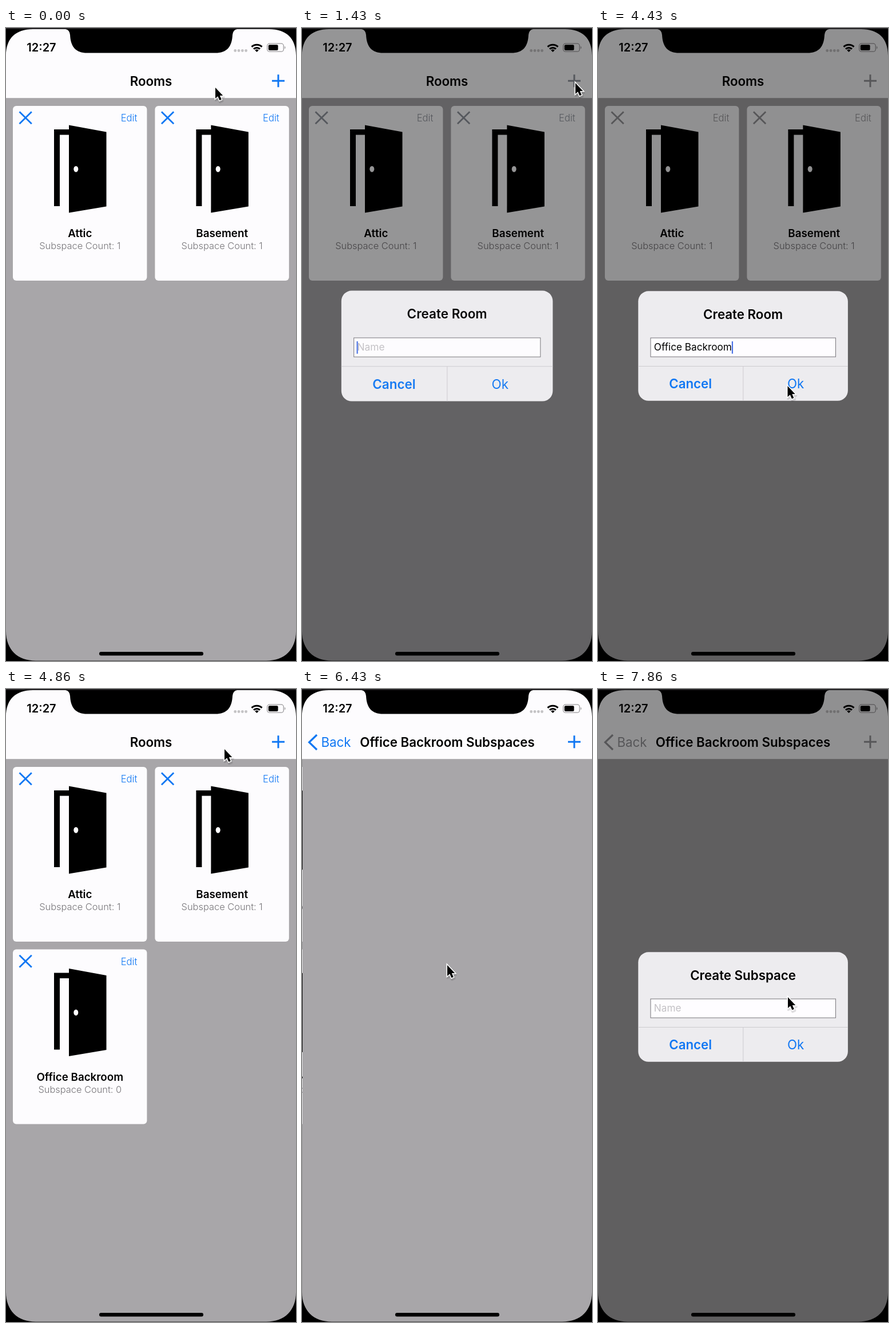
Animation of 507 by 1105 pixels, one loop 8000 ms. Source, as an HTML page:

```html
<!DOCTYPE html>
<html lang="en">
<head>
<meta charset="utf-8">
<title>Rooms</title>
<style>
html, body { margin: 0; width: 100%; height: 100%; overflow: hidden; background: #000; }
svg { display: block; width: 507px; height: 1105px; font-family: Inter, "Open Sans", sans-serif; }
.mid { text-anchor: middle; }
.bold { font-weight: 600; }
.thin { font-weight: 300; }
.nav { font-size: 22.3px; }
.line { fill: none; stroke: var(--tint); }
.tint { fill: var(--tint); }
</style>
</head>
<body>
<svg id="stage" viewBox="0 0 507 1105">
  <defs>
    <clipPath id="body"><rect y="123" width="507" height="982"/></clipPath>
    <g id="door">
      <path d="M84 177H111V186.5H94V311H84Z"/>
      <path d="M110 169.5L175.5 181.5V311.5L110 322.5Z"/>
      <ellipse cx="122.3" cy="246.2" rx="4" ry="5.3" fill="#fdfcfe"/>
    </g>
  </defs>

  <rect width="507" height="1105" fill="#a8a6a9"/>
  <g clip-path="url(#body)">
    <g id="rooms"></g>
    <rect id="veil" y="123" width="507" height="982"/>
    <rect id="page" y="123" width="507" height="982" fill="#a8a6a9"/>
  </g>

  <rect width="507" height="122.5" fill="#fdfcfe"/>
  <rect y="122" width="507" height="1" fill="#b9b7ba"/>
  <text id="title" class="mid bold nav" y="100.5">Rooms</text>
  <text id="subtitle" class="mid bold nav" y="100.5">Office Backroom Subspaces</text>
  <g id="back">
    <path class="line" d="M26 80L12.5 93L26 106" stroke-width="3.2"/>
    <text class="tint nav" x="33.5" y="100.5">Back</text>
  </g>
  <path class="line" d="M465 92.3H487M476 81.3V103.3" stroke-width="3"/>

  <text class="mid bold" x="62" y="41.3" font-size="20">12:27</text>
  <g fill="#c4c3c5">
    <circle cx="400.7" cy="39.5" r="2.4"/><circle cx="407" cy="39.5" r="2.4"/>
    <circle cx="413.3" cy="39.5" r="2.4"/><circle cx="419.6" cy="39.5" r="2.4"/>
  </g>
  <g fill="none" stroke="#000" stroke-width="3">
    <path d="M429.5 32.8A13 13 0 0 1 447.5 32.8"/>
    <path d="M433 36.6A8 8 0 0 1 444 36.6"/>
  </g>
  <path d="M435.2 38.8A4.8 4.8 0 0 1 441.8 38.8L438.5 42Z"/>
  <rect x="456.7" y="27.2" width="28.6" height="14" rx="4" fill="none" stroke="#99979a" stroke-width="1.3"/>
  <rect x="458.8" y="29.3" width="16.8" height="9.8" rx="2"/>
  <path d="M487 31.6Q490 34.2 487 36.8Z" fill="#99979a"/>

  <rect id="dim" width="507" height="1105"/>

  <g id="alert">
    <rect id="panel" x="70.3" y="459.3" width="366.6" height="191.5" rx="18" fill="#edecef"/>
    <g id="content">
      <text id="heading" class="mid bold nav" x="253.6" y="507.8"></text>
      <rect x="92" y="541" width="323.5" height="33" fill="#fefdff" stroke="#77757a"/>
      <text id="entry" x="97.8" y="563.4" font-size="17.2"></text>
      <rect id="caret" y="547" width="2.2" height="21.5" fill="#4a72e4"/>
      <path d="M70.3 590.5H436.9M253.8 590.5V650.8" stroke="#cdcbcf"/>
      <g class="mid nav" fill="#1077f3">
        <text class="bold" x="161.7" y="629.3">Cancel</text>
        <text x="345.6" y="629.3">Ok</text>
      </g>
    </g>
  </g>

  <rect x="163" y="1089" width="182" height="6.4" rx="3.2"/>
  <path fill-rule="evenodd" d="M0 0H507V1105H0ZM0 48V1053C0 1085 20 1104.5 52 1104.5H455C487 1104.5 507 1085 507 1053V48C507 18 490 2 460 2H404Q397 3 396 12C395 33 386 43.5 366 43.5H142C122 43.5 113 33 112 12Q111 3 104 2H47C17 2 0 18 0 48Z"/>
  <rect width="507" height="2" fill="#222123"/>

  <g id="cursor">
    <path d="M0 0V19L4.3 15.2L7.4 22.3L10.8 20.8L7.8 14H13.2Z" transform="translate(1 2.5)" fill="none" stroke="#000" stroke-width="5" stroke-linejoin="round" opacity=".12"/>
    <path d="M0 0V19L4.3 15.2L7.4 22.3L10.8 20.8L7.8 14H13.2Z" stroke="#fff" stroke-width="3" paint-order="stroke"/>
  </g>
</svg>
<script>
const LOOP = 8000, FPS = 7;
const NAME = "Office Backroom";
const $ = id => document.getElementById(id);
const set = (id, attrs) => {
  for (const k in attrs) $(id).setAttribute(k, attrs[k]);
};
const clamp = v => Math.min(1, Math.max(0, v));
const mix = (a, b, p) => a + (b - a) * p;

const card = (id, x, y, name, count) => `
  <g id="${id}" transform="translate(${x} ${y})">
    <rect x="12" y="136" width="234.4" height="305" rx="6" fill="#fdfcfe"/>
    <path class="line" d="M23.5 146.3L44.8 167.3M44.8 146.3L23.5 167.3" stroke-width="2.8"/>
    <text class="mid thin tint" x="215" y="163" font-size="16.6">Edit</text>
    <use href="#door"/>
    <text class="mid bold" x="129.3" y="365.3" font-size="18.8">${name}</text>
    <text class="mid thin" x="129.3" y="386" font-size="16.4" fill="#777579">Subspace Count: ${count}</text>
  </g>`;
$("rooms").innerHTML =
  card("attic", 0, 0, "Attic", 1) +
  card("basement", 248.4, 0, "Basement", 1) +
  card("office", 0, 318.5, NAME, 0);

// Pointer tip: time, x, y
const PATH = [
  [0, 366, 104], [570, 470, 50], [710, 489, 47], [1000, 478, 96], [1429, 478, 96],
  [2286, 254, 151], [3430, 254, 600], [4140, 331.5, 625], [4429, 331.5, 625],
  [4857, 382, 105], [5570, 190, 590], [6000, 190, 590], [6429, 254, 482],
  [6860, 330, 330], [7143, 474, 94], [7286, 449, 83], [7714, 336, 515], [7857, 332, 538]
];
function pointer(t) {
  const i = PATH.findIndex(k => k[0] > t);
  if (i < 0) return PATH[PATH.length - 1].slice(1);
  const [t0, x0, y0] = PATH[i - 1], [t1, x1, y1] = PATH[i];
  const u = (t - t0) / (t1 - t0), e = u * u * (3 - 2 * u);
  return [mix(x0, x1, e), mix(y0, y1, e)];
}

const OPEN_ROOM = 1224, CLOSE_ROOM = 4440, OPEN_SUB = 7223, PUSH = 5990;
const rise = u => u > 0 ? 1 - Math.exp(-u * 0.0156) : 0;
function presence(t) {
  if (t >= OPEN_SUB) return rise(t - OPEN_SUB);
  if (t < CLOSE_ROOM) return rise(t - OPEN_ROOM);
  const p = Math.exp((CLOSE_ROOM - t) * 0.022);
  return p < 0.01 ? 0 : p;
}

function drawAlert(t, p) {
  const closing = t >= CLOSE_ROOM && t < OPEN_SUB;
  const sub = t >= OPEN_SUB;
  const s = closing ? 1 : 1 + 0.2 * (1 - p);
  set("alert", {
    transform: `translate(253.6 555) scale(${s}) translate(-253.6 -555)`,
    visibility: p > 0 ? "visible" : "hidden"
  });
  set("panel", { opacity: closing ? p : 1 - (1 - p) ** 2 });
  set("content", { opacity: p });
  $("heading").textContent = sub ? "Create Subspace" : "Create Room";

  const count = sub ? 0 : Math.floor(Math.max(0, 2 + (t - 2286) / 85));
  const typed = NAME.slice(0, count);
  const entry = $("entry");
  entry.textContent = typed || "Name";
  entry.setAttribute("fill", typed ? "#000" : "#c3c1c5");
  const width = typed ? entry.getComputedTextLength() : -1;
  const typing = t > 2100 && t < 3430;
  const since = t - (sub ? OPEN_SUB : t < 2100 ? OPEN_ROOM : 3430);
  const lit = typing || since % 700 < 450;
  set("caret", { x: 97.8 + width, opacity: lit ? 1 : 0 });
}

function drawPush(t) {
  const u = Math.max(0, t - PUSH) * 0.0195;
  const p = 1 - (1 + u) * Math.exp(-u);
  set("rooms", { transform: `translate(${-152 * p} 0)` });
  set("veil", { opacity: 0.1 * p });
  set("page", { x: 507 * (1 - p) });
  set("title", { x: mix(253.5, 59, p), opacity: clamp(1 - 1.5 * p) });
  set("subtitle", { x: mix(507, 253.5, p), opacity: p });
  set("back", { opacity: p });
  set("office", { visibility: t > 4640 ? "visible" : "hidden" });
}

function draw(ms) {
  const t = Math.floor((ms % LOOP + 5) * FPS / 1000) * 1000 / FPS % LOOP;
  const p = presence(t);
  const tint = [[16, 150], [119, 150], [243, 154]].map(c => Math.round(mix(c[0], c[1], p)));
  $("stage").style.setProperty("--tint", `rgb(${tint})`);
  set("dim", { opacity: 0.43 * p });
  drawPush(t);
  drawAlert(t, p);
  set("cursor", { transform: `translate(${pointer(t)})` });
}

const start = performance.now();
function tick() {
  draw(performance.now() - start);
  requestAnimationFrame(tick);
}
tick();
</script>
</body>
</html>
```
